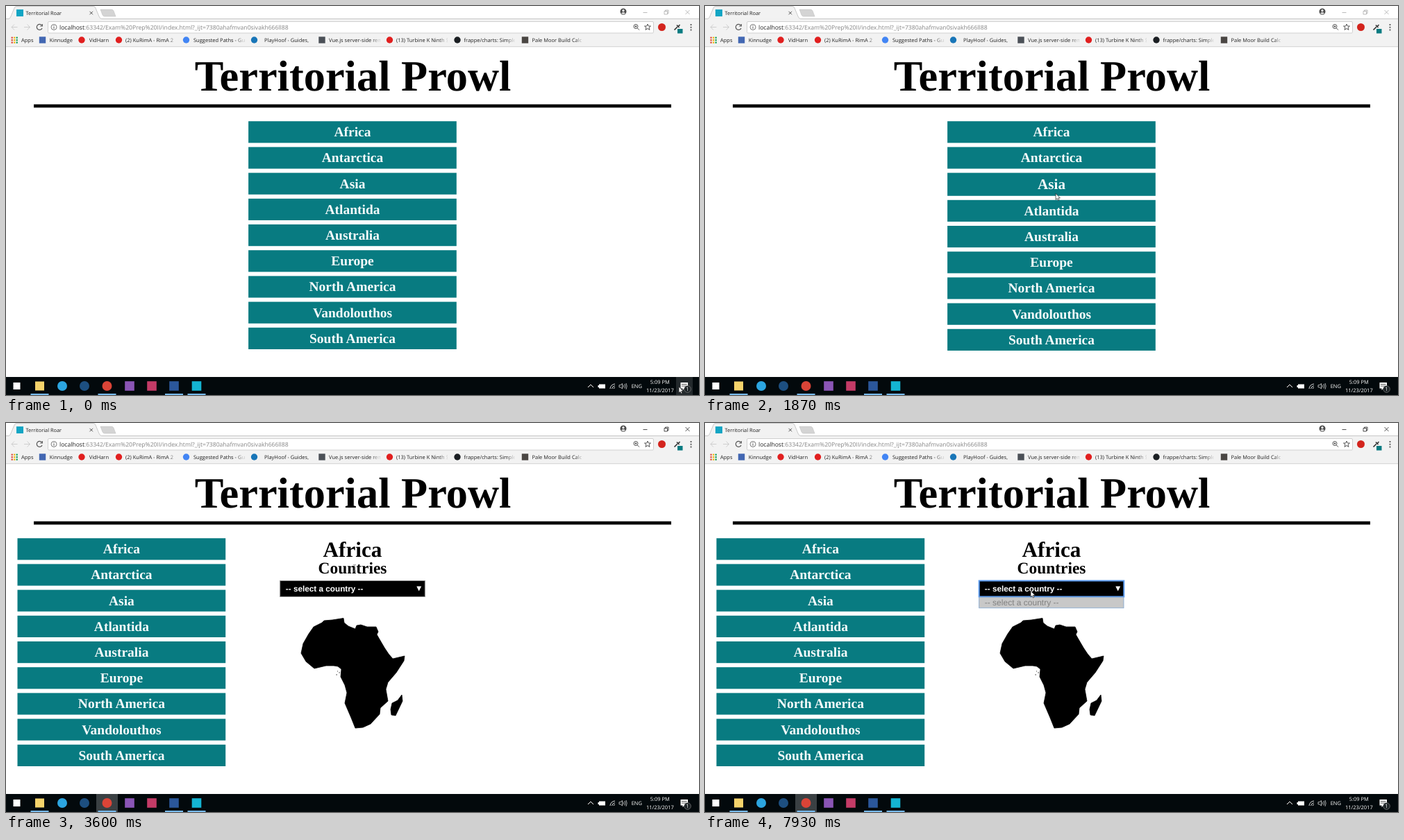
Animation, 998 px wide and 561 px high, one loop 8000 ms. Source, as an HTML page:

```html
<!DOCTYPE html>
<html lang="en">
<head>
<meta charset="utf-8">
<title>Territorial Roar</title>
<style>
  html, body { margin: 0; width: 100%; height: 100%; overflow: hidden; background: #fff; }
  svg { display: block; }
  text { text-rendering: geometricPrecision; white-space: pre; }
  .ui { font: 7.5px "Open Sans", sans-serif; fill: #222; }
  .tray { fill: #fff; text-anchor: middle; }
  .serif { font-family: "Liberation Serif", serif; font-weight: bold; text-anchor: middle; }
  .sans { font-family: "Liberation Sans", sans-serif; }
  .line { fill: none; stroke: #555; stroke-width: 1; }
</style>
</head>
<body>
<svg id="stage" width="998" height="561" viewBox="0 0 998 561">
  <defs>
    <linearGradient id="fade">
      <stop offset="0" stop-color="#f2f2f2" stop-opacity="0"/>
      <stop offset="1" stop-color="#f2f2f2"/>
    </linearGradient>
  </defs>
  <rect width="998" height="561" fill="#fff"/>

  <!-- browser frame -->
  <rect y="18" width="998" height="41" fill="#f2f2f2"/>
  <path d="M0 18.5H4Q6 18 7 15L12 3Q13 .5 15 .5H126Q128 .5 129 3L134 15Q135 18.5 138 18.5H998" fill="#f2f2f2" stroke="#bdbdbd" stroke-width=".8"/>
  <path d="M0 58.7H998" stroke="#c9c9c9" stroke-width=".8"/>
  <path d="M136 5H152Q154 5 155 7L158 15H142Q140 15 139 13Z" fill="#d4d4d4" stroke="#bbb" stroke-width=".5"/>
  <rect x="15" y="5" width="10" height="10" fill="#12a5c4"/>
  <text class="ui" x="28.5" y="12.5" style="font-size:7.4px">Territorial Roar</text>
  <path class="line" d="M120.5 7.8L125 12.3M125 7.8L120.5 12.3" stroke-width=".9"/>
  <g fill="#4a4a4a"><circle cx="889" cy="8" r="4.5"/><circle cx="889" cy="6.7" r="1.6" fill="#fff"/><path d="M886 10.6Q889 7.8 892 10.6Q889 12.6 886 10.6" fill="#fff"/></g>
  <path id="controls" d="M917.5 9.5H923.5M948 7.5H952.5V12H948ZM949.5 7.3V6H954V10.5H952.7M978.5 6L984.5 12M984.5 6L978.5 12" fill="none" stroke-width=".8"/>
  <path class="line" d="M16.5 30.5H8M12 26.5L8 30.5L12 34.5M26 30.5H34.5M30.5 26.5L34.5 30.5L30.5 34.5" style="stroke:#cecece"/>
  <path class="line" d="M51.5 28A4 4 0 1 0 52 32M52.3 26V29H49.2" style="stroke-width:1.2"/>
  <rect x="60.5" y="22.5" width="872" height="16.5" rx="1.5" fill="#fff" stroke="#c6c6c6" stroke-width=".8"/>
  <circle class="line" cx="69" cy="30.5" r="4" style="stroke-width:.8"/>
  <path class="line" d="M69 29.8V32.8M69 28V29"/>
  <text class="ui" x="77" y="33.6" style="font-size:8.6px">localhost<tspan fill="#858585">:63342/Exam%20Prep%20II/index.html?_ijt=7380ahafmvan0sivakh666ll88</tspan></text>
  <circle class="line" cx="907" cy="29.5" r="3"/>
  <path class="line" d="M909.2 31.8L912 34.7M905.5 29.5H908.5M907 28V31"/>
  <path class="line" d="M924 26L925.3 29H928.5L926 31.1L927 34.4L924 32.5L921 34.4L922 31.1L919.5 29H922.7Z" stroke-width=".9"/>
  <circle cx="944.5" cy="30.5" r="5.5" fill="#d3241d"/>
  <path d="M962.5 34.5L967 30M966 27.5L969.5 31M968 29.5L970.5 27" stroke="#333" stroke-width="1.6"/>
  <rect x="967" y="33" width="7.5" height="6.5" fill="#087b81"/>
  <path d="M986.5 26V28M986.5 29.7V31.7M986.5 33.4V35.4" stroke="#555" stroke-width="1.8"/>
  <g id="bookmarks"></g>

  <!-- page -->
  <text class="serif" x="499.5" y="122" font-size="62.4">Territorial Prowl</text>
  <rect x="40" y="141.8" width="918" height="4.7"/>
  <g id="list"></g>
  <g id="detail">
    <text class="serif" x="499" y="192.7" font-size="31.2">Africa</text>
    <text class="serif" x="499" y="217" font-size="23.4">Countries</text>
    <rect id="select" x="394.7" y="227.5" width="208.6" height="23" stroke="#8a8a8a"/>
    <text class="sans" x="402.8" y="243.2" font-size="11.75" font-weight="bold" fill="#fff">-- select a country --</text>
    <path d="M591.3 235.5H598.2L594.7 242.5Z" fill="#fff"/>
    <g id="options">
      <rect x="394.7" y="251.2" width="208.3" height="15.6" fill="#c8c8c8" stroke="#7fa5cf" stroke-width=".8"/>
      <text class="sans" x="402.8" y="262.5" font-size="12" fill="#808080">-- select a country --</text>
    </g>
    <path d="M455 288L458 285L470 284L486 281.5L487 288L493 293L503 297L505 292L511 291L520 294L533 294L536 301L534 305L538 312L545 324L551 333L557 340L574 336L573 343L562 360L550 374L547 384L550 401L539 411L538 420L525 434L514 439L503 440L497 425L488 404L491 389L488 378L482 366L483 355L478 351L472 350L461 350L444 354L432 344L425 332L428 318L436 304L443 294Z M570 392L571 401L561 422L555 421L554 413L556 404L564 400Z" stroke="#000" stroke-width=".8" stroke-linejoin="round"/>
    <path d="M475.5 363h1.3M479.5 360h1.4M477 358h.8" stroke="#000"/>
  </g>

  <!-- taskbar -->
  <rect y="535" width="998" height="26" fill="#03090c"/>
  <rect id="active" x="130" y="535" width="31" height="26" fill="#3a4043"/>
  <rect id="notify" x="965" y="535" width="24" height="26" fill="#23292c"/>
  <g id="apps"></g>
  <path d="M838 550L842 546L846 550" class="line" style="stroke:#fff"/>
  <path d="M854 545.5H863V551.5H854ZM852.5 547H854V550H852.5Z" fill="#fff"/>
  <path d="M870 552Q870.5 546 877 545M872.5 552Q873 548.5 877 547.7M875 552Q875.3 550.5 877 550.2" class="line" style="stroke:#ddd"/>
  <path d="M883 546.7H885L887.5 544.5V552L885 549.8H883ZM889 546.5Q890.3 548.2 889 550M891 545Q893 548.2 891 551.5M893 544Q895.3 548.2 893 552.8" class="line" style="stroke:#ddd;stroke-width:.8"/>
  <text class="ui tray" x="908.3" y="551">ENG</text>
  <text class="ui tray" x="941.8" y="544.5">5:09 PM</text>
  <text class="ui tray" x="941.8" y="556.5">11/23/2017</text>
  <path d="M971.5 543H982V551.5H977L974.5 554V551.5H971.5Z" fill="#fff"/>
  <path d="M973 545.5H980.5M973 548H980.5" stroke="#111" stroke-width=".7"/>
  <circle cx="981.5" cy="552.5" r="4.8" fill="#1c2225" stroke="#888" stroke-width=".7"/>
  <text class="ui tray" x="981.5" y="555.3">1</text>

  <g id="cursor">
    <path id="arrow" d="M0 0V9L2 7.1L3.4 10.1L4.9 9.4L3.6 6.5H6.3Z" fill="#fff" stroke="#222" stroke-width=".7"/>
    <path id="beam" d="M-2 -4.7H-.5L0 -4.2L.5 -4.7H2M0 -4.2V4.2M-2 4.7H-.5L0 4.2L.5 4.7H2" fill="none" stroke="#7d7d7d" stroke-width=".9"/>
  </g>
</svg>

<script>
const $ = id => document.getElementById(id);

function add(parent, tag, attrs, text) {
  const node = document.createElementNS('http://www.w3.org/2000/svg', tag);
  for (const key in attrs) node.setAttribute(key, attrs[key]);
  if (text) node.textContent = text;
  parent.appendChild(node);
  return node;
}

const dot = (parent, x, y, r, fill) => add(parent, 'circle', { cx: x, cy: y, r, fill });
const square = (parent, x, y, r, fill) =>
  add(parent, 'rect', { x: x - r, y: y - r, width: 2 * r, height: 2 * r, fill });

// bookmarks: icon shape, icon x, colour, text x, label
const bookmarks = [
  [square, 52.5, '#4267b2', 62.7, 'Kinnudge'],
  [dot, 109, '#e11f1f', 119.7, 'VidHarn'],
  [dot, 162.5, '#e11f1f', 172, '(2) KuRimA - RimA 2'],
  [dot, 259.5, '#4285f4', 270, 'Suggested Paths - Gu'],
  [dot, 357.5, '#1976b8', 372, 'PlayHoof - Guides, '],
  [square, 455, '#4b5057', 465, 'Vue.js server-side rendering'],
  [dot, 552.5, '#e11f1f', 562, '(13) Turbine K Ninth Stage'],
  [dot, 650, '#1b1f23', 659.5, 'frappe/charts: Simple, responsive'],
  [square, 747.5, '#4a4643', 757.5, 'Pale Moor Build Calc'],
];
const bar = $('bookmarks');
['#db4437', '#f4b400', '#0f9d58'].forEach((fill, col) => {
  for (let row = 0; row < 3; row++) square(bar, 8.7 + col * 3.5, 45.7 + row * 3.5, 1.1, fill);
});
add(bar, 'text', { class: 'ui', x: 22, y: 51.8 }, 'Apps');
for (const [icon, iconX, fill, x, label] of bookmarks) {
  icon(bar, iconX, 49, 4.7, fill);
  const clip = add(bar, 'svg', { x, y: 42, width: 73.5, height: 15 });
  add(clip, 'text', { class: 'ui', y: 9.8 }, label);
  add(clip, 'rect', { x: 61, width: 13, height: 15, fill: 'url(#fade)' });
}

// taskbar icons: shape, x, radius, colour, running
const apps = [
  [square, 15.5, 5, '#fff', false],
  [square, 48.5, 6.5, '#f5d36b', true],
  [dot, 81, 7, '#2ca5e0', false],
  [dot, 113, 7, '#1d4f80', false],
  [dot, 145.5, 7, '#db4437', true],
  [square, 178, 6.8, '#8a55b5', false],
  [square, 210, 6.8, '#c43b67', false],
  [square, 242, 6.8, '#2b579a', true],
  [square, 274.5, 6.8, '#14b4d2', true],
];
for (const [icon, x, r, fill, running] of apps) {
  icon($('apps'), x, 548, r, fill);
  if (running) add($('apps'), 'rect', { x: x - 13, y: 559, width: 26, height: 2, fill: '#76b9ed' });
}

const rows = ['Africa', 'Antarctica', 'Asia', 'Atlantida', 'Australia', 'Europe',
  'North America', 'Vandolouthos', 'South America'].map(name => ({
  box: add($('list'), 'rect', { width: 299.7, fill: '#087b81' }),
  label: add($('list'), 'text', { class: 'serif', x: 149.9, fill: '#f6fbfb' }, name),
}));

function layoutList(left, x, y) {
  $('list').setAttribute('transform', `translate(${left} 0)`);
  let top = 166.2;
  for (const { box, label } of rows) {
    const hover = x > left && x < left + 299.7 && y >= top && y < top + 33.2;
    const height = hover ? 33.2 : 31.2;
    box.setAttribute('y', top);
    box.setAttribute('height', height);
    label.setAttribute('font-size', hover ? 21.2 : 19.5);
    label.setAttribute('y', top + (hover ? 23.3 : 22));
    top += height + 6;
    if (hover) y = -1;
  }
}

const DURATION = 8000, RATE = 15 / 1000;
const FOCUS = 2800, CHOOSE = 2930, LOADED = 3070, OPEN = 3870;

// time, x, y
const path = [
  [0, 969, 549], [330, 870, 440], [530, 730, 270], [670, 662, 222], [870, 590, 250],
  [1000, 526, 174], [1130, 520, 179], [1200, 520, 179],
  [1500, 512, 205], [1870, 505, 271], [2000, 505, 271],
  [2300, 503, 225], [2600, 501, 185.5], [3200, 501, 185.5], [3330, 503, 185.5], [3400, 503, 185.5],
  [3600, 502, 209], [3930, 492, 246], [4000, 492, 246], [4130, 493, 251], [4270, 493, 251],
  [4600, 495, 271], [4930, 497, 240], [5000, 497, 240],
  [5270, 570, 220], [5500, 690, 205], [5670, 780, 250], [5870, 829, 336],
  [6000, 880, 284], [6270, 862, 230], [6600, 829, 245], [6740, 829, 245],
  [7100, 630, 240], [7400, 474, 255], [7800, 474, 255], [7930, 469, 242], [8000, 469, 242],
];
// spans during which the pointer is over text
const textSpans = [[930, 1300], [1400, 1460], [1660, 1730], [2130, 2200], [2330, 2400], [2530, 3800]];

function pointerAt(t) {
  const i = Math.max(1, path.findIndex(p => p[0] >= t));
  const [t0, x0, y0] = path[i - 1], [t1, x1, y1] = path[i];
  const k = (t - t0) / (t1 - t0);
  return [x0 + (x1 - x0) * k, y0 + (y1 - y0) * k];
}

const show = (id, on) => $(id).setAttribute('visibility', on ? 'visible' : 'hidden');

function render(t) {
  const [x, y] = pointerAt(t);
  const focused = t >= FOCUS - 5, open = t >= OPEN - 5, loaded = t >= LOADED - 5;
  layoutList(t >= CHOOSE ? 16.5 : 349.1, x, y);
  show('detail', loaded);
  show('options', open);
  show('active', focused);
  show('notify', x > 965 && y > 535);
  $('controls').setAttribute('stroke', focused ? '#222' : '#aaa');
  $('select').setAttribute('stroke', open ? '#5c9cf0' : '#8a8a8a');
  $('select').setAttribute('stroke-width', open ? 2 : 1);
  const overText = textSpans.some(([from, to]) => t >= from && t < to);
  show('beam', overText);
  show('arrow', !overText);
  $('cursor').setAttribute('transform', `translate(${x} ${y})`);
}

const start = performance.now();
function tick() {
  const t = (performance.now() - start) % DURATION;
  render(Math.floor(t * RATE + 0.06) / RATE);
  requestAnimationFrame(tick);
}
tick();
</script>
</body>
</html>
```
